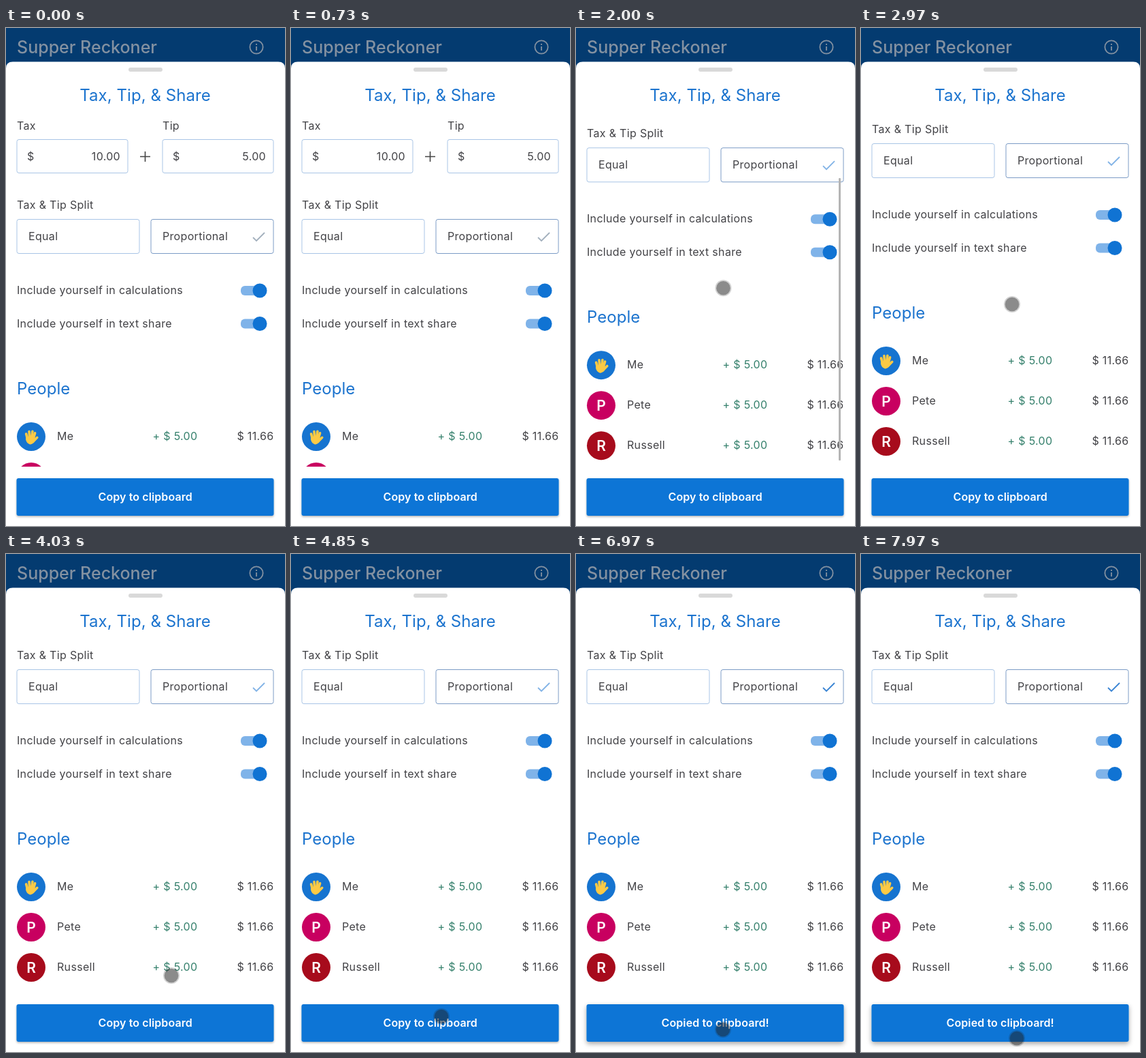
These frames come from a looping animation (410 by 730 pixels, 8000 ms). An HTML page:

```html
<!DOCTYPE html>
<html lang="en">
<head>
<meta charset="utf-8">
<title>Tax, Tip, &amp; Share</title>
<style>
  html, body { margin: 0; width: 100%; height: 100%; overflow: hidden; background: #fff; }
  svg { display: block; width: 410px; height: 730px; }
  text { font: 16px Inter, Roboto, sans-serif; letter-spacing: .32px; fill: #424246; }
  .title { font-size: 24px; letter-spacing: .05px; fill: #1b73ce; }
  .brand { font-size: 25px; font-weight: 500; letter-spacing: 0; fill: #8391a1; }
  .label { font-weight: 600; letter-spacing: .1px; fill: #fff; }
  .initial { font-size: 21px; font-weight: 600; letter-spacing: 0; fill: #fff; }
  .extra { fill: #35806c; }
  .middle { text-anchor: middle; }
  .end { text-anchor: end; }
  .box { fill: #fff; stroke: #a9c5e6; }
  .chosen { stroke: #7c9cc6; }
</style>
</head>
<body>
<svg viewBox="0 0 410 730" xmlns="http://www.w3.org/2000/svg">
  <defs>
    <clipPath id="viewport"><rect y="131" width="410" height="512"/></clipPath>
    <filter id="resting" x="-5%" y="-15%" width="110%" height="140%">
      <feDropShadow dx="0" dy="1.5" stdDeviation="1.5" flood-color="#000" flood-opacity=".3"/>
    </filter>
    <filter id="raised" x="-5%" y="-15%" width="110%" height="150%">
      <feDropShadow dx="0" dy="3" stdDeviation="3.5" flood-color="#000" flood-opacity=".35"/>
    </filter>
  </defs>

  <rect width="410" height="70" fill="#043b70"/>
  <text class="brand" x="16" y="37">Supper Reckoner</text>
  <g fill="none" stroke="#8391a1" stroke-width="1.8">
    <circle cx="368" cy="28" r="9.6"/>
    <path d="M368 27v6M368 23v2"/>
  </g>

  <path d="M0 730V59q0-9.5 10-9.5h390q10 0 10 9.5v671z" fill="#fff"/>
  <rect x="180" y="58" width="50" height="6" rx="3" fill="#d9d9d9"/>
  <text class="title middle" x="204.5" y="107">Tax, Tip, &amp; Share</text>

  <g clip-path="url(#viewport)"><g id="content"></g></g>
  <rect id="bar" x="386" width="3" height="414" rx="1" fill="#b5b5b5"/>

  <rect id="plate" x="15.5" y="660" width="378" height="55" rx="3" fill="#0d74d6"/>
  <text id="button" class="label middle" x="204.7" y="692.5"></text>

  <g id="pointer" fill="#202020">
    <circle r="12" fill-opacity=".2"/>
    <circle r="10.3" fill-opacity=".4"/>
  </g>
</svg>
<script>
const LOOP = 8000, SCROLL_MAX = 111, DRAG_START = 1316, DRAG_END = 2116, COPIED_AT = 6700;
const el = id => document.getElementById(id);

const text = (x, y, value, cls = '') => `<text x="${x}" y="${y}" class="${cls}">${value}</text>`;
const box = (x, y, w, h, cls = '') =>
  `<rect class="box ${cls}" x="${x}" y="${y}" width="${w}" height="${h}" rx="3"/>`;

const money = (x, name, value) =>
  text(x, 148.5, name) + box(x, 163.5, 163, 49) +
  text(x + 15, 194, '$') + text(x + 152, 194, value, 'end');

const toggle = (y, name) =>
  text(16, y + 5.5, name) +
  `<rect x="345" y="${y - 6.5}" width="36" height="14" rx="6" fill="#7fb3e9"/>
   <circle cx="373" cy="${y + .5}" r="10.5" fill="#1073d3"/>`;

const hand = y => `<g transform="translate(36.5 ${y + 1}) rotate(8)" fill="none" stroke="#fcca45"
  stroke-linecap="round" stroke-width="3.6">
  <path d="M-5 2L-7.5-4M-2 0L-3.6-8M1.2 0L1.2-9M4 2L5.2-7M4 6L9.2-1"/>
  <path d="M-6 1H5L6 4Q4 9 0 9.5Q-4 9-6 4Z" fill="#fcca45" stroke-width="2"/></g>`;

const person = (name, color, i) => {
  const y = 599 + i * 59;
  return `<circle cx="37" cy="${y}" r="21" fill="${color}"/>` +
    (i ? text(37, y + 7.5, name[0], 'initial middle') : hand(y)) +
    text(75, y + 5, name) + text(215.5, y + 5, '+ $ 5.00', 'extra') +
    text(393.5, y + 5, '$ 11.66', 'end');
};

el('content').innerHTML =
  money(16, 'Tax', '10.00') + money(230, 'Tip', '5.00') +
  '<path d="M197 188.5h15M204.5 181v15" stroke="#444" stroke-width="1.6"/>' +
  text(16, 264.5, 'Tax &amp; Tip Split') +
  box(16, 280.5, 180, 50) + text(33, 311, 'Equal') +
  box(213, 280.5, 180, 50, 'chosen') + text(230, 311, 'Proportional') +
  '<path id="check" d="M363 307l5 5 12-12" fill="none" stroke-width="1.8"/>' +
  toggle(384.5, 'Include yourself in calculations') +
  toggle(433, 'Include yourself in text share') +
  text(16, 536.5, 'People', 'title') +
  [['Me', '#1674d0'], ['Pete', '#c80060'], ['Russell', '#a70b1c']]
    .map(([name, color], i) => person(name, color, i)).join('');

// time, x, y
const path = [
  [800, 204, 500], [DRAG_START, 208, 486], [DRAG_END, 217, 375], [2350, 219, 375],
  [2970, 222, 405], [4030, 243, 618], [4850, 221, 678], [6060, 210, 695],
  [7000, 216, 697], [7970, 229, 710], [LOOP, 229, 710]
];

const ramp = (t, a, b) => Math.min(1, Math.max(0, (t - a) / (b - a)));
const smooth = u => u * u * (3 - 2 * u);

function pointerAt(t) {
  const i = Math.max(1, path.findIndex(p => p[0] > t));
  const [a, b] = [path[i - 1], path[i]];
  const u = smooth(ramp(t, a[0], b[0]));
  return [a[1] + (b[1] - a[1]) * u, a[2] + (b[2] - a[2]) * u];
}

function draw(t) {
  const scroll = SCROLL_MAX * smooth(ramp(t, DRAG_START, DRAG_END));
  el('content').setAttribute('transform', `translate(0 ${-scroll})`);
  el('bar').setAttribute('y', 134 + scroll * .82);
  el('bar').setAttribute('opacity', ramp(t, DRAG_START, DRAG_START + 100) * (1 - ramp(t, 2450, 2750)));

  const [x, y] = pointerAt(t);
  el('pointer').setAttribute('transform', `translate(${x} ${y})`);
  el('pointer').setAttribute('visibility', t < path[0][0] ? 'hidden' : 'visible');

  const copied = t >= COPIED_AT;
  el('button').textContent = copied ? 'Copied to clipboard!' : 'Copy to clipboard';
  el('plate').setAttribute('filter', `url(#${copied ? 'raised' : 'resting'})`);
  el('check').setAttribute('stroke', copied ? '#3984d3' : t < 800 ? '#a3b0bd' : '#82b3e6');
}

const start = performance.now();
function frame() {
  draw((performance.now() - start) % LOOP);
  requestAnimationFrame(frame);
}
frame();
</script>
</body>
</html>
```
